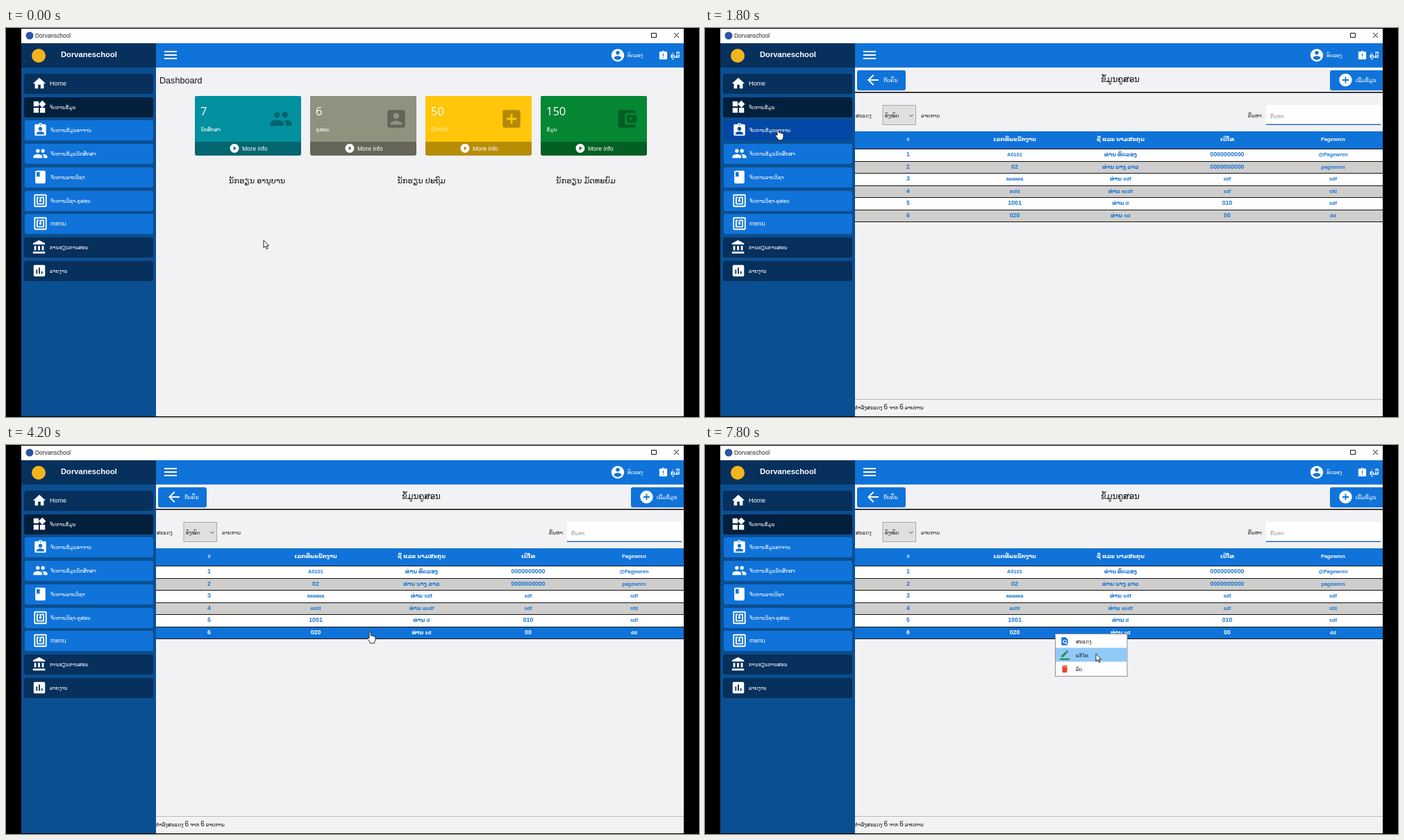
An HTML page for the animation above (8 s loop, 998 px wide and 561 px high).

```html
<!DOCTYPE html>
<html lang="lo">
<head>
<meta charset="utf-8">
<title>Dorvanschool</title>
<style>
html, body { margin: 0; width: 100%; height: 100%; overflow: hidden; background: #000; }
svg { display: block; width: 100%; height: 100%; font-family: "Liberation Sans", "DejaVu Sans", sans-serif; }
</style>
</head>
<body>
<svg id="stage" viewBox="0 0 998 561" xmlns="http://www.w3.org/2000/svg"></svg>
<script>
const BLUE = '#1073d9', DARK = '#07305c', BG = '#f2f1f4', LOOP = 8000, STEP = 200;
const LEFT = 22, SPLIT = 216, RIGHT = 976, WIDE = RIGHT - SPLIT, SMALL = 7.2;

// 24-unit icon outlines
const box = 'M19 3H5c-1.1 0-2 .9-2 2v14c0 1.1.9 2 2 2h14c1.1 0 2-.9 2-2V5c0-1.1-.9-2-2-2z';
const disc = 'M12 2C6.48 2 2 6.48 2 12s4.48 10 10 10 10-4.48 10-10S17.52 2 12 2z';
const board = 'M19 3h-4.18C14.4 1.84 13.3 1 12 1c-1.3 0-2.4.84-2.82 2H5c-1.1 0-2 .9-2 2v14c0 1.1.9 2 2 2h14c1.1 0 2-.9 2-2V5c0-1.1-.9-2-2-2z';
const plus = 'M17 13h-4v4h-2v-4H7v-2h4V7h2v4h4z';
const ICONS = {
  menu: 'M3 18h18v-2H3zM3 13h18v-2H3zM3 6v2h18V6z',
  home: 'M10 20v-6h4v6h5v-8h3L12 3 2 12h3v8z',
  widgets: 'M13 13v8h8v-8zM3 21h8v-8H3zM3 3v8h8V3zM16.66 1.69L11 7.34 16.66 13l5.66-5.66z',
  teacher: board + 'M12 3c.55 0 1 .45 1 1s-.45 1-1 1-1-.45-1-1 .45-1 1-1zm0 4c1.66 0 3 1.34 3 3s-1.34 3-3 3-3-1.34-3-3 1.34-3 3-3zm6 12H6v-1.4c0-2 4-3.1 6-3.1s6 1.1 6 3.1z',
  late: board + 'M13 18h-2v-2h2zM13 14h-2V8h2zM12 5c-.55 0-1-.45-1-1s.45-1 1-1 1 .45 1 1-.45 1-1 1z',
  group: 'M16 11c1.66 0 3-1.34 3-3s-1.34-3-3-3-3 1.34-3 3 1.34 3 3 3zm-8 0c1.66 0 3-1.34 3-3S9.66 5 8 5 5 6.34 5 8s1.34 3 3 3zm0 2c-2.33 0-7 1.17-7 3.5V19h14v-2.5C15 14.17 10.33 13 8 13zm8 0c-.29 0-.62.02-.97.05C16.2 13.9 17 15 17 16.5V19h6v-2.5c0-2.33-4.67-3.5-7-3.5z',
  book: 'M18 2H6c-1.1 0-2 .9-2 2v16c0 1.1.9 2 2 2h12c1.1 0 2-.9 2-2V4c0-1.1-.9-2-2-2zM6 4h5v8l-2.5-1.5L6 12z',
  frame: 'M20 2H4c-1.1 0-2 .9-2 2v16c0 1.1.9 2 2 2h16c1.1 0 2-.9 2-2V4c0-1.1-.9-2-2-2zm0 18H4V4h16zM18 6h-5c-1.1 0-2 .9-2 2v2.28c-.6.35-1 .98-1 1.72 0 1.1.9 2 2 2s2-.9 2-2c0-.74-.4-1.38-1-1.72V8h3v8H8V8h2V6H6v12h12z',
  bank: 'M4 10v7h3v-7zM10 10v7h3v-7zM2 22h19v-3H2zM16 10v7h3v-7zM11.5 1L2 6v2h19V6z',
  chart: box + 'M9 17H7v-7h2zM13 17h-2V7h2zM17 17h-2v-4h2z',
  user: disc + 'M12 5c1.66 0 3 1.34 3 3s-1.34 3-3 3-3-1.34-3-3 1.34-3 3-3zm0 14.2c-2.5 0-4.71-1.28-6-3.22.03-1.99 4-3.08 6-3.08s5.97 1.09 6 3.08c-1.29 1.94-3.5 3.22-6 3.22z',
  person: box + 'M15 9c0 1.66-1.34 3-3 3s-3-1.34-3-3 1.34-3 3-3 3 1.34 3 3zM6 17c0-2 4-3.1 6-3.1s6 1.1 6 3.1v1H6z',
  addBox: box + plus,
  add: disc + plus,
  play: disc + 'M10 16.5v-9l6 4.5z',
  wallet: 'M21 18v1c0 1.1-.9 2-2 2H5c-1.1 0-2-.9-2-2V5c0-1.1.9-2 2-2h14c1.1 0 2 .9 2 2v1h-9c-1.1 0-2 .9-2 2v8c0 1.1.9 2 2 2zM12 16h10V8H12zM16 10.5a1.5 1.5 0 1 0 .01 0z',
  back: 'M20 11H7.83l5.59-5.59L12 4l-8 8 8 8 1.41-1.41L7.83 13H20z',
  view: 'M20 19.59V8l-6-6H6c-1.1 0-2 .9-2 2v16c0 1.1.9 2 2 2h12c.45 0 .85-.15 1.19-.4l-4.43-4.43c-.8.52-1.74.83-2.76.83-2.76 0-5-2.24-5-5s2.24-5 5-5 5 2.24 5 5c0 1.02-.31 1.96-.83 2.75zM9 13c0 1.66 1.34 3 3 3s3-1.34 3-3-1.34-3-3-3-3 1.34-3 3z',
  edit: 'M17.75 7L14 3.25l-10 10V17h3.75zM20.71 4.04c.39-.39.39-1.02 0-1.41L18.37.29c-.39-.39-1.02-.39-1.41 0L15 2.25 18.75 6zM0 20h24v4H0z',
  trash: 'M6 19c0 1.1.9 2 2 2h8c1.1 0 2-.9 2-2V7H6zM19 4h-3.5l-1-1h-5l-1 1H5v2h14z'
};

function el(parent, tag, attrs, content) {
  const node = document.createElementNS('http://www.w3.org/2000/svg', tag);
  for (const k in attrs) node.setAttribute(k, attrs[k]);
  if (content !== undefined) node.textContent = content;
  return parent.appendChild(node);
}
const rect = (p, x, y, width, height, fill, rx = 0) => el(p, 'rect', { x, y, width, height, fill, rx });
const path = (p, d, attrs) => el(p, 'path', { d, ...attrs });
const text = (p, s, x, y, size, fill, more) => el(p, 'text', { x, y, 'font-size': size, fill, ...more }, s);
const icon = (p, name, cx, cy, size, fill = '#fff', opacity = 1) => path(p, ICONS[name], {
  transform: `translate(${cx - size / 2} ${cy - size / 2}) scale(${size / 24})`,
  fill, opacity, 'fill-rule': 'evenodd'
});
const MID = { 'text-anchor': 'middle' }, BOLD = { 'font-weight': 'bold' };
const show = (node, on) => node.setAttribute('visibility', on ? 'visible' : 'hidden');

const stage = document.getElementById('stage');

function buildShell() {
  rect(stage, 0, 0, 998, 561, '#000');
  rect(stage, LEFT, 1, RIGHT - LEFT, 21, '#fff');
  rect(stage, LEFT, 57, SPLIT - LEFT, 503, '#0a4f91');
  rect(stage, LEFT, 22, SPLIT - LEFT, 35, DARK);
  rect(stage, SPLIT, 22, WIDE, 35, BLUE);
  rect(stage, SPLIT, 57, WIDE, 503, BG);
  el(stage, 'circle', { cx: 34, cy: 11, r: 5.5, fill: '#2d54a6' });
  text(stage, 'Dorvanschool', 42, 14, 8.4, '#222');
  path(stage, 'M929.5 7.5h7v6h-7zM962 7l7 7m0-7l-7 7', { fill: 'none', stroke: '#111' });
  el(stage, 'circle', { cx: 47, cy: 40, r: 10, fill: '#f3b51f' });
  text(stage, 'Dorvaneschool', 79, 42, 11.2, '#fff', BOLD);
  icon(stage, 'menu', 237, 39, 24);
  icon(stage, 'user', 881, 39.3, 22);
  text(stage, 'ທົດລອງ', 895, 41.5, SMALL, '#fff');
  icon(stage, 'late', 946.5, 39.5, 15);
  text(stage, 'ຄູ່ມື', 957, 42.5, 8.5, '#fff', BOLD);
}

function buildSidebar() {
  return [
    ['home', 'Home'], ['widgets', 'ຈັດການຂໍ້ມູນ'],
    ['teacher', 'ຈັດການຂໍ້ມູນອາຈານ', 1], ['group', 'ຈັດການຂໍ້ມູນນັກສຶກສາ', 1],
    ['book', 'ຈັດການລາຍວິຊາ', 1], ['frame', 'ຈັດການວິຊາ-ຄູສອນ', 1], ['frame', 'menu', 1],
    ['bank', 'ການຮຽນການສອນ'], ['chart', 'ລາຍງານ']
  ].map(([name, label, sub], i) => {
    const top = Math.round(66 + i * 33.7), x = sub ? 27 : 26;
    const base = sub ? BLUE : i === 1 ? '#021f3c' : DARK;
    const back = rect(stage, x, top, 212 - x, 29, base, 3);
    icon(stage, name, sub ? 49.5 : 48, top + 14, 22);
    text(stage, label, sub ? 64 : 63, top + 16.7, /[a-z]/.test(label) ? 9 : SMALL, '#fff');
    return { back, top, base, over: sub ? '#0348a6' : base };
  });
}

function buildDashboard() {
  const g = el(stage, 'g');
  text(g, 'Dashboard', 221, 80, 12.6, '#111');
  [
    ['7', 'ນັກສຶກສາ', 'group', '#03909f', '#02656f'],
    ['6', 'ຄູສອນ', 'person', '#90917f', '#656659'],
    ['50', 'Detail', 'addBox', '#ffc60a', '#b78d06'],
    ['150', 'ຂໍ້ມູນ', 'wallet', '#058733', '#045f24']
  ].forEach(([count, label, name, fill, foot], i) => {
    const x = 272 + i * 166;
    rect(g, x, 98, 153, 86, foot, 3);
    rect(g, x, 98, 153, 66, fill, 3);
    rect(g, x, 160, 153, 4, fill);
    text(g, count, x + 8, 126, 16.5, '#fff', { 'font-family': '"Open Sans", sans-serif' });
    text(g, label, x + 8.5, 149, i === 2 ? 9.2 : SMALL, i === 2 ? '#ffe9a0' : '#fff');
    icon(g, name, x + 124, 131, 34, '#000', .3);
    icon(g, 'play', x + 57, 173.5, 15.5);
    text(g, 'More info', x + 68, 176.7, 8.8, '#fff');
  });
  ['ນັກຮຽນ ອານຸບານ', 'ນັກຮຽນ ປະຖົມ', 'ນັກຮຽນ ມັດທະຍົມ']
    .forEach((s, i) => text(g, s, 361.5 + i * 236.7, 224, 11.2, '#111', MID));
  return g;
}

const COLS = [292.5, 446, 598.5, 752, 904.5], ROW_TOP = 174, ROW_H = 17.5;
const rowY = i => Math.round(ROW_TOP + i * ROW_H);
const cellSize = s => /^\d/.test(s) ? 8.8 : /[\u0e80-\u0eff]/.test(s) ? 7.8 : 7.4;
const cells = (p, list, y, fill) => list.forEach((s, i) =>
  text(p, s, COLS[i], y, cellSize(s), fill, { ...MID, ...BOLD }));

function buildTable() {
  const g = el(stage, 'g');
  rect(g, 219, 61, 70, 29, BLUE, 3);
  icon(g, 'back', 242, 75, 24);
  text(g, 'ກັບຄືນ', 257, 77.5, 7.8, '#fff');
  text(g, 'ຂໍ້ມູນຄູສອນ', 598, 77.7, 11.8, '#111', MID);
  path(g, 'M900 64q0-3 3-3h73v29h-73q-3 0-3-3z', { fill: BLUE });
  icon(g, 'add', 922.5, 75, 22);
  text(g, 'ເພີ່ມຂໍ້ມູນ', 937, 77.5, 7.8, '#fff');
  rect(g, SPLIT, 92, WIDE, 1.6, '#111');
  text(g, 'ສະແດງ', 217, 128.5, SMALL, '#222');
  el(g, 'rect', { x: 256, y: 111.5, width: 47.5, height: 28, fill: '#dfdfdf', stroke: '#aaa' });
  text(g, 'ທັງໝົດ', 259, 128.5, SMALL, '#222');
  path(g, 'M294.5 125l2.5 2.5 2.5-2.5', { fill: 'none', stroke: '#444' });
  text(g, 'ລາຍການ', 311, 128.5, SMALL, '#222');
  text(g, 'ຄົ້ນຫາ:', 782, 128.5, SMALL, '#222');
  rect(g, 808, 111, 165, 28, '#fff');
  rect(g, 808, 138.5, 165, 1.5, '#2a6db0');
  text(g, 'ຄົ້ນຫາ', 814, 130, SMALL, '#9a9a9a');
  rect(g, SPLIT, 149, WIDE, 25, BLUE);
  cells(g, ['#', 'ເລກທີ່ພະນັກງານ', 'ຊື່ ແລະ ນາມສະກຸນ', 'ເບີໂທ', 'Pagewren'], 163, '#fff');
  const rows = [
    ['1', 'A0101', 'ທ່ານ ທົດລອງ', '0000000000', '@Pagewren'],
    ['2', '02', 'ທ່ານ ນາງ ລາວ', '0000000000', 'pagewren'],
    ['3', 'aaaaaa', 'ທ່ານ sdf', 'sdf', 'sdf'],
    ['4', 'asfd', 'ທ່ານ asdf', 'sdf', 'sfd'],
    ['5', '1001', 'ທ່ານ d', '010', 'sdf'],
    ['6', '020', 'ທ່ານ sd', '00', 'dd']
  ].map((list, i) => {
    const y = rowY(i), base = i % 2 ? '#cfcecd' : '#fff';
    const back = rect(g, SPLIT, y, WIDE, rowY(i + 1) - y, base);
    const label = el(g, 'g');
    cells(label, list, y + 11.3);
    return { back, label, base };
  });
  for (let i = 0; i <= rows.length; i++) rect(g, SPLIT, rowY(i), WIDE, 1, '#111');
  rect(g, SPLIT, 535, WIDE, 1, '#b8b8ba');
  const foot = text(g, '', SPLIT, 550, SMALL, '#111');
  'ກຳລັງສະແດງ | 6| ຈາກ | 6| ລາຍການ'.split('|').forEach(s =>
    el(foot, 'tspan', { 'font-size': s.includes('6') ? 10 : SMALL }, s));
  return { g, rows };
}

function buildMenu() {
  const g = el(stage, 'g');
  el(g, 'rect', { x: 504.5, y: 272.5, width: 103.5, height: 61, fill: '#fff', stroke: '#8c8f94' });
  const pick = rect(g, 505, 292.5, 102.5, 20, '#91c9f7');
  [['view', 'ສະແດງ', BLUE], ['edit', 'ແກ້ໄຂ', '#24904c'], ['trash', 'ລົບ', '#f2402e']].forEach(([name, label, fill], i) => {
    const y = 283 + i * 20;
    icon(g, name, 518, y, 14, fill);
    text(g, label, 534, y + 2.7, SMALL, '#222');
  });
  return { g, pick };
}

function buildPointer() {
  const g = el(stage, 'g', { fill: '#fff', stroke: '#111', 'stroke-width': .9, 'stroke-linejoin': 'round' });
  const arrow = path(g, 'M0 0V11L2.6 8.6 4.4 12.8 6.1 12 4.3 8H7.6Z');
  const hand = path(g, 'M-1 9V.8Q-1-.4 .2-.4T1.4.8V5Q3.6 4.2 4 5.6 6 5 6.4 6.4 8 6 8 7.6V11Q8 13 6.6 14.4V15.8H.2V14.4L-3.6 9.4Q-3.8 7.6-2.2 8Z');
  return { g, arrow, hand };
}

buildShell();
const items = buildSidebar();
const dash = buildDashboard();
const table = buildTable();
const menu = buildMenu();
const pointer = buildPointer();

// time, x, y of the pointer tip
const TRACK = [
  [0, 371, 306], [1400, 105, 146], [2000, 105, 146], [3200, 520, 256], [3800, 520, 256],
  [4200, 524, 270], [4400, 524, 270], [5000, 505, 272], [5600, 505, 272],
  [6000, 543, 293], [7600, 563, 301], [LOOP, 563, 301]
];

function tipAt(t) {
  const i = TRACK.findIndex(k => k[0] > t);
  const [t0, x0, y0] = TRACK[i - 1], [t1, x1, y1] = TRACK[i];
  const u = (t - t0) / (t1 - t0), e = u * u * (3 - 2 * u);
  return [x0 + (x1 - x0) * e, y0 + (y1 - y0) * e];
}

function draw(t) {
  const [x, y] = tipAt(t);
  const listed = t >= 1800, open = t >= 5400;
  show(dash, !listed);
  show(table.g, listed);
  show(menu.g, open);
  show(menu.pick, open && y > 292.4);

  let link = false;
  items.forEach(it => {
    const over = x > 26 && x < 212 && y >= it.top && y < it.top + 29;
    link = link || over;
    it.back.setAttribute('fill', over ? it.over : it.base);
  });
  const row = open ? 5 : listed && x > SPLIT ? Math.floor((y - ROW_TOP) / ROW_H) : -1;
  table.rows.forEach((r, i) => {
    r.back.setAttribute('fill', i === row ? BLUE : r.base);
    r.label.setAttribute('fill', i === row ? '#fff' : '#1b76d2');
  });
  link = link || (row >= 0 && t <= 6000);
  show(pointer.hand, link);
  show(pointer.arrow, !link);
  pointer.g.setAttribute('transform', `translate(${x} ${y})`);
}

const start = performance.now();
function tick() {
  const t = (performance.now() - start) % LOOP;
  draw(Math.floor(t / STEP) * STEP);
  requestAnimationFrame(tick);
}
tick();
</script>
</body>
</html>
```
